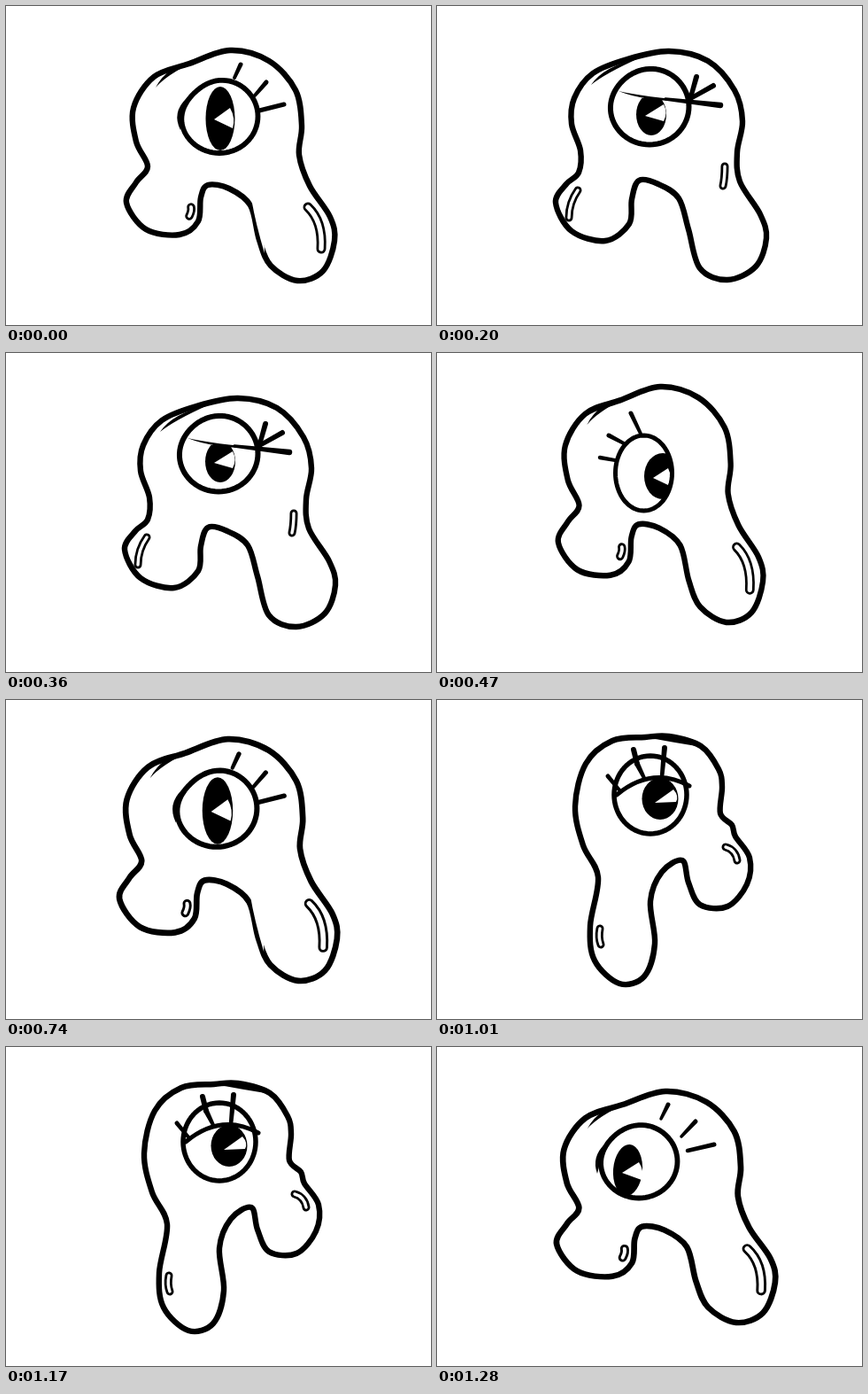
Animation, 480 px wide and 360 px high, one loop 1510 ms. Source, as an HTML page with a canvas:

```html
<!DOCTYPE html>
<html lang="en">
<head>
<meta charset="utf-8">
<title>One-eyed blob</title>
<style>
  html, body { margin: 0; width: 100%; height: 100%; overflow: hidden; background: #fff; }
  canvas { display: block; width: 480px; height: 360px; }
</style>
</head>
<body>
<canvas id="stage" width="480" height="360"></canvas>
<script>
const ctx = document.getElementById('stage').getContext('2d');
const INK = '#000', PAPER = '#fff';

function stroke(width, color = INK) {
  ctx.lineWidth = width;
  ctx.strokeStyle = color;
  ctx.stroke();
}

function fill(color = INK) {
  ctx.fillStyle = color;
  ctx.fill();
}

// Closed Catmull-Rom outline through a few key points, clockwise from the top.
function blob(...pts) {
  const n = pts.length;
  const at = i => pts[(i + n) % n];
  ctx.beginPath();
  ctx.moveTo(...at(0));
  for (let i = 0; i < n; i++) {
    const [a, b, c, d] = [at(i - 1), at(i), at(i + 1), at(i + 2)];
    ctx.bezierCurveTo(
      b[0] + (c[0] - a[0]) / 6, b[1] + (c[1] - a[1]) / 6,
      c[0] - (d[0] - b[0]) / 6, c[1] - (d[1] - b[1]) / 6, c[0], c[1]);
  }
  ctx.closePath();
  stroke(6.4);
}

// Ellipse, optionally flattened toward the upper left.
function eyePath(x, y, rx, ry, dent = 0) {
  ctx.beginPath();
  for (let i = 0; i < 72; i++) {
    const a = i * Math.PI / 36;
    const r = 1 - dent * Math.max(0, Math.cos(a - Math.PI * 1.25)) ** 4;
    ctx.lineTo(x + rx * r * Math.cos(a), y + ry * r * Math.sin(a));
  }
  ctx.closePath();
}

function pupil(x, y, rx, ry, tilt = 0) {
  ctx.beginPath();
  ctx.ellipse(x, y, rx, ry, tilt, 0, Math.PI * 2);
  fill();
}

// Wedge of light: a tip and a far side that bulges to the right.
function shine(x, y, x1, y1, x2, y2) {
  ctx.beginPath();
  ctx.moveTo(x, y);
  ctx.lineTo(x1, y1);
  ctx.quadraticCurveTo((x1 + x2) / 2 + 5, (y1 + y2) / 2, x2, y2);
  ctx.closePath();
  fill(PAPER);
}

// Pointed sliver between two curves that share both ends.
function sliver(x1, y1, ax, ay, bx, by, x2, y2, color) {
  ctx.beginPath();
  ctx.moveTo(x1, y1);
  ctx.quadraticCurveTo(ax, ay, x2, y2);
  ctx.quadraticCurveTo(bx, by, x1, y1);
  fill(color);
}

function arc(x1, y1, cx, cy, x2, y2) {
  ctx.beginPath();
  ctx.moveTo(x1, y1);
  ctx.quadraticCurveTo(cx, cy, x2, y2);
}

// Hollow bent highlight.
function glint(width, ...curve) {
  arc(...curve);
  stroke(width);
  stroke(width - 5.6, PAPER);
}

// Round-ended stroke that narrows from w1 to w2.
function lash(x1, y1, x2, y2, w1 = 5, w2 = 4) {
  const dir = Math.atan2(y2 - y1, x2 - x1), q = Math.PI / 2;
  ctx.beginPath();
  ctx.arc(x1, y1, w1 / 2, dir + q, dir - q);
  ctx.arc(x2, y2, w2 / 2, dir - q, dir + q);
  ctx.closePath();
  fill();
}

function stride() {
  blob([253, 50], [297, 62], [327, 95], [334, 135], [331, 168], [343, 203], [366, 238],
    [371, 265], [358, 299], [329, 310], [299, 293], [286, 264], [276, 225], [252, 206],
    [228, 202], [220, 216], [217, 243], [196, 258], [158, 252], [136, 222], [147, 199],
    [160, 181], [147, 153], [144, 115], [167, 80], [207, 65]);
  sliver(169, 92, 182, 67, 181, 78, 212, 63);
  glint(9.5, 209, 227, 210, 231, 207, 237);
  glint(11, 341, 227, 358, 243, 356, 274);
}

function stare() {
  stride();
  sliver(277, 217, 292, 246, 282, 246, 292, 279, PAPER);
  eyePath(241, 124.5, 43.5, 41.5, 0.09);
  stroke(5.8);
  sliver(204, 104, 187, 120, 198, 122, 197, 140);
  pupil(242, 127, 16.5, 36);
  shine(235, 128, 253, 115, 256, 138);
  lash(265, 66, 258, 81);
  lash(294, 86, 281, 101);
  lash(314, 111, 286, 118, 5, 5);
}

function scowl() {
  blob([262, 51], [306, 62], [336, 95], [345, 130], [339, 165], [342, 198], [365, 235],
    [372, 262], [360, 294], [328, 309], [297, 296], [284, 252], [273, 217], [250, 201],
    [228, 197], [220, 218], [217, 246], [190, 265], [152, 254], [134, 222], [146, 201],
    [160, 188], [162, 163], [152, 133], [155, 104], [176, 76], [215, 60]);
  sliver(174, 89, 188, 68, 190, 76, 228, 59);
  glint(9, 159, 208, 149, 222, 149, 239);
  glint(9, 325, 181, 325, 194, 323, 203);
  eyePath(240, 113.5, 44.5, 43, 0.04);
  stroke(6);
  sliver(201, 95, 188, 110, 197, 112, 199, 130);
  ctx.save();
  ctx.beginPath();
  ctx.rect(200, 104, 80, 60);
  ctx.clip();
  pupil(242, 122.5, 17, 23.5);
  ctx.restore();
  shine(235, 124, 256, 111, 256, 130);
  sliver(205, 96, 236, 103, 238, 109, 288, 107);
  lash(293, 80, 286, 105, 6, 5);
  lash(312, 90, 287, 104, 6, 5);
  lash(320, 112, 258, 105, 6.5, 3.5);
}

function lookRight() {
  eyePath(233.5, 135.5, 32, 42.5);
  ctx.save();
  ctx.clip();
  pupil(255, 139, 21, 26);
  ctx.restore();
  shine(244, 141, 261, 130, 261, 149);
  eyePath(233.5, 135.5, 32, 42.5);
  stroke(5);
  lash(219, 68, 230, 91);
  lash(194, 93, 211, 102);
  lash(184, 118, 201, 121, 4.5, 4);
}

function lookLeft() {
  eyePath(228, 129, 43.5, 41.5, 0.06);
  stroke(5.8);
  sliver(190, 109, 174, 124, 185, 126, 181, 143);
  pupil(215.5, 139, 16.5, 29, 0.08);
  shine(209, 142, 228, 130, 231, 150);
  lash(261, 65, 253, 81, 5, 3.5);
  lash(292, 84, 276, 101, 5, 3.5);
  lash(313, 110, 283, 117, 5, 4.5);
}

function sleepy() {
  blob([262, 41], [298, 52], [318, 78], [322, 98], [320, 128], [333, 141], [337, 154],
    [353, 178], [350, 208], [328, 233], [297, 231], [284, 206], [277, 181], [254, 194],
    [241, 227], [246, 275], [234, 312], [206, 320], [178, 294], [173, 255], [182, 200],
    [165, 164], [156, 120], [168, 72], [198, 46], [235, 42]);
  sliver(241, 43, 270, 34, 268, 48, 293, 52);
  glint(9, 326, 166, 337, 169, 339, 181);
  glint(9, 184, 258, 182, 268, 185, 276);
  eyePath(241, 107, 41, 44);
  stroke(5.5);
  pupil(252, 111.5, 20.5, 23.5);
  shine(246, 116, 267, 101, 270, 115);
  arc(203, 107, 243, 74, 285, 97);
  stroke(5);
  lash(222, 56, 226, 72, 6, 6);
  lash(226, 72, 234, 88, 6, 4);
  lash(257, 54, 254, 87, 6, 4.5);
  lash(193, 86, 207, 103);
}

// Fits the striding figure into another box.
function fitted(x, y, w, h, draw) {
  ctx.save();
  ctx.translate(x, y);
  ctx.scale(w / 241, h / 266);
  ctx.translate(-133, -47);
  draw();
  ctx.restore();
}

const poses = [
  { until: 200, draw: stare },
  { until: 470, draw: scowl },
  { until: 740, draw() { fitted(134, 35, 237, 272, stride); lookRight(); } },
  { until: 1010, draw() { fitted(125, 41, 252, 279, stare); } },
  { until: 1280, draw: sleepy },
  { until: 1510, draw() { fitted(132, 47, 253, 267, stride); lookLeft(); } }
];
const LOOP = 1510;
const start = performance.now();
let shown = null;

function render() {
  const t = Math.max(0, performance.now() - start) % LOOP;
  const pose = poses.find(p => t < p.until);
  if (pose !== shown) {
    shown = pose;
    ctx.fillStyle = PAPER;
    ctx.fillRect(0, 0, 480, 360);
    ctx.lineCap = ctx.lineJoin = 'round';
    pose.draw();
  }
  requestAnimationFrame(render);
}
render();
</script>
</body>
</html>
```
